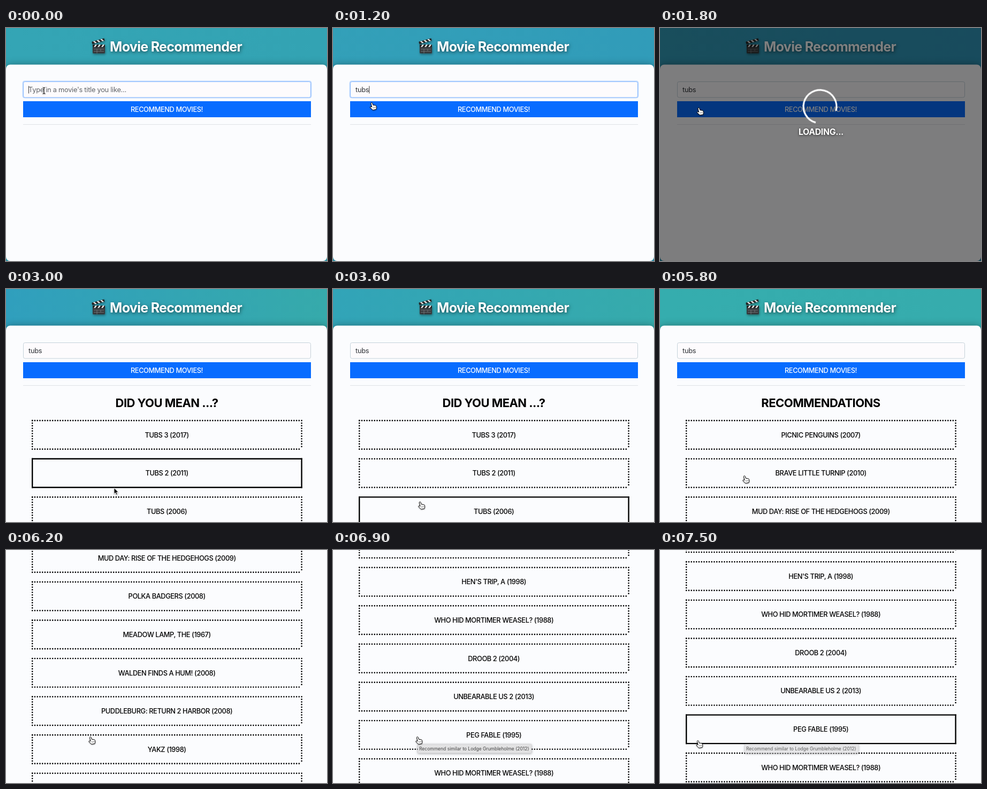
Write an HTML page that moves like this. It is 600x436 px and loops after 7600 ms.

```html
<!DOCTYPE html>
<html lang="en">
<head>
<meta charset="utf-8">
<title>Movie Recommender</title>
<style>
  html, body { margin: 0; width: 100%; height: 100%; overflow: hidden; background: #fbfcfe; }
  svg { display: block; width: 100vw; height: 100vh; }
  text { font: 12.8px Inter, Roboto, sans-serif; letter-spacing: -.02em; }
  .mid { text-anchor: middle; }
  #title { font-size: 25px; font-weight: 700; letter-spacing: -.028em; fill: #fff; filter: drop-shadow(1px 2px 3px #0008); }
  #heading { font-size: 22px; font-weight: 700; letter-spacing: -.025em; }
  #loading { font-size: 15.8px; font-weight: 700; fill: #fff; filter: drop-shadow(0 1px 2px #000a); }
  #tip text { font-size: 8.5px; letter-spacing: 0; fill: #404040; }
  #card { filter: drop-shadow(0 0 7px #0005); }
  .label { font-weight: 500; letter-spacing: -.032em; }
  .row path { fill: none; stroke: #000; stroke-width: 2.7; stroke-linecap: round; }
  .row.hover path { stroke-width: 2.4; stroke-dasharray: none; stroke-linecap: square; }
  .pointer { stroke-linejoin: round; filter: drop-shadow(0 1px 1px #0005); }
  #left { animation: left 7.6s linear infinite; }
  #right { animation: right 7.6s linear infinite; }
  #spinner { transform-origin: 299px 147px; animation: spin .9s steps(9) infinite; }
  @keyframes left {
    0% { stop-color: #34a5b5; } 23.7% { stop-color: #329dba; } 39.5% { stop-color: #309fbd; }
    61.8%, 100% { stop-color: #35adae; }
  }
  @keyframes right {
    0% { stop-color: #33a3b3; } 23.7% { stop-color: #3098bc; } 39.5% { stop-color: #36aaab; }
    61.8%, 100% { stop-color: #36acad; }
  }
  @keyframes spin { from { transform: rotate(105deg); } to { transform: rotate(465deg); } }
</style>
</head>
<body>
<svg viewBox="0 0 600 436" preserveAspectRatio="none">
  <defs>
    <linearGradient id="sky"><stop id="left" offset="0"/><stop id="right" offset="1"/></linearGradient>
  </defs>
  <g id="page">
    <rect width="600" height="436" fill="url(#sky)"/>
    <rect id="card" y="68.5" width="600" rx="8" fill="#fbfcfe"/>

    <g id="clapper" filter="drop-shadow(1px 2px 2px #0006)">
      <rect x="162" y="31" width="23" height="16.5" rx="1.5" fill="#373a3d"/>
      <path d="M162 31h23v4.5h-23z" fill="#222"/>
      <path d="M164 35.5l3-4.5h3l-3 4.5zm7 0l3-4.5h3l-3 4.5zm7 0l3-4.5h3l-3 4.5z" fill="#e8e8e8"/>
      <g transform="rotate(-16 162 30)">
        <path d="M161.5 25.5h24v4.5h-24z" fill="#222"/>
        <path d="M164 25.5l3 4.5h3l-3-4.5zm7 0l3 4.5h3l-3-4.5zm7 0l3 4.5h3l-3-4.5z" fill="#e8e8e8"/>
      </g>
      <path d="M164 39.5h19M164 43.5h19M170 39.5v8M177 39.5v4" stroke="#85898c" stroke-width=".7"/>
    </g>
    <text id="title" class="mid" x="317.5" y="44">Movie Recommender</text>

    <rect id="ring" x="30.5" y="98.5" width="541" height="33" rx="4.5" fill="#c2dbfe"/>
    <rect id="field" x="32.5" y="100.5" width="537" height="29.5" rx="3" fill="#fdfbfd"/>
    <text id="query" x="42" y="120.2"></text>
    <path id="caret" d="M0 108.5v14" stroke="#222" stroke-width=".9"/>
    <path d="M32 137h538v30H32z" fill="#086cff"/>
    <text class="mid label" x="300.5" y="156.8" fill="#fff">RECOMMEND MOVIES!</text>
    <path d="M32 180.5h538" stroke="#dfe2e6"/>

    <text id="heading" class="mid" x="300.5" y="221"></text>
    <g id="guesses"></g>
    <g id="results"></g>
  </g>

  <g id="overlay">
    <rect width="600" height="436" fill="#000" opacity=".5"/>
    <path id="spinner" d="M330 147A31 31 0 1 1 299 116" fill="none" stroke="#fff" stroke-width="3.2"/>
    <text id="loading" class="mid" x="301" y="199.5">LOADING...</text>
  </g>

  <g id="tip">
    <rect x="158.5" y="363.5" width="212.5" height="16.5" rx="1" fill="#e2e2e3" stroke="#d2d2d3" stroke-width=".6" filter="drop-shadow(0 1px 2px #0005)"/>
    <text class="mid" x="263.8" y="374.8">Recommend similar to Lodge Grumbleholme (2012)</text>
  </g>

  <g id="mouse">
    <path id="beam" class="pointer" d="M-2.5-6q2 0 2.5 1.5 .5-1.5 2.5-1.5M0-4.5v9M-2.5 6q2 0 2.5-1.5 .5 1.5 2.5 1.5" fill="none" stroke="#222" stroke-width="1.1"/>
    <path id="arrow" class="pointer" d="M0 0v11.2l2.6-2.4 1.8 4.2 2-.9-1.8-4h3.5z" stroke="#fff" stroke-width=".9"/>
    <g id="hand" class="pointer">
      <path d="M-2 1.4A1.3 1.3 0 0 1 .5.5L1.8 4.2l4.4.6q1.6.3 1.8 1.8l.3 2.6q0 1.4-.8 3.2l-5.3 1q-1 .1-1.8-.8L-3.2 9q-.9-1.1.1-1.7 1-.4 2.2.4l.6.3z" fill="#fff" stroke="#000" stroke-width="1"/>
      <path d="M2 8l.4 2.6M4 7.7l.4 2.6M5.9 7.4l.4 2.6" stroke="#333" stroke-width=".6"/>
    </g>
  </g>
</svg>
<script>
const LOOP = 7600, STEP = 100, FIRST_ROW = 273, PITCH = 71.6;
const BOX_W = 503.4, BOX_H = 53.5;
const $ = id => document.getElementById(id);
const show = (id, on) => { $(id).style.display = on ? '' : 'none'; };
const within = (t, from, to) => t >= from && t < to;

const lists = {
  guesses: ['TUBS 3 (2017)', 'TUBS 2 (2011)', 'TUBS (2006)'],
  results: [
    'PICNIC PENGUINS (2007)', 'BRAVE LITTLE TURNIP (2010)',
    'MUD DAY: RISE OF THE HEDGEHOGS (2009)', 'POLKA BADGERS (2008)',
    'MEADOW LAMP, THE (1967)', 'WALDEN FINDS A HUM! (2008)',
    'PUDDLEBURG: RETURN 2 HARBOR (2008)', 'YAKZ (1998)',
    'LODGE GRUMBLEHOLME (2012)', 'SNAIL PARADE (2005)',
    "HEN'S TRIP, A (1998)", 'WHO HID MORTIMER WEASEL? (1988)',
    'DROOB 2 (2004)', 'UNBEARABLE US 2 (2013)', 'PEG FABLE (1995)',
    'WHO HID MORTIMER WEASEL? (1988)'
  ]
};

// two parallel sides, each carrying a whole number of dots
const sides = (across, step, length, dots) =>
  `<path d="M0 0${step}${length}M${across}${step}${length}" stroke-dasharray="0 ${length / dots}"/>`;

for (const [id, titles] of Object.entries(lists)) {
  $(id).innerHTML = titles.map((title, i) =>
    `<g class="row" transform="translate(0 ${FIRST_ROW + i * PITCH})">
      <g transform="translate(49.2 -26.8)">
        ${sides(`0 ${BOX_H}`, 'h', BOX_W, 106)}${sides(`${BOX_W} 0`, 'v', BOX_H, 11)}
      </g>
      <text class="mid label" x="300.7" y="4.7">${title}</text></g>`).join('');
}

// time, x, y, pointer shape until the next point
const mousePath = [
  [0, 71, 117, 'beam'], [200, 71, 117, ''], [900, 71, 117, 'beam'],
  [1200, 73, 140, 'hand'], [1400, 73, 149.5, 'hand'], [2400, 73, 149.5, 'hand'],
  [2700, 150, 270, 'hand'], [2900, 195, 355, 'arrow'], [3000, 202, 372.3, 'arrow'],
  [3200, 202, 384, 'arrow'], [3400, 190, 397, 'hand'], [4000, 110, 402, 'hand'],
  [4400, 90, 404, ''], [5700, 90, 404, ''], [5800, 158.5, 350, 'hand'],
  [7100, 158.5, 350, 'hand'], [7400, 71.5, 357, 'hand'], [LOOP, 71.5, 357, 'hand']
];

function mouseAt(t) {
  const i = mousePath.findIndex(p => p[0] > t);
  const [t0, x0, y0, shape] = mousePath[i - 1], [t1, x1, y1] = mousePath[i];
  const k = (t - t0) / (t1 - t0);
  return { x: x0 + (x1 - x0) * k, y: y0 + (y1 - y0) * k, shape };
}

// a flick that speeds up, then glides to rest
function scrollAt(t) {
  const flick = 401.2, end = 940.4;
  if (t < 5900) return 0;
  if (t < 6200) return flick * ((t - 5900) / 300) ** 2;
  return end - (end - flick) * Math.exp((6200 - t) / 180);
}

function drawField(t) {
  const focused = t < 1700;
  const typed = 'tubs'.slice(0, [200, 400, 500, 700].filter(key => t >= key).length);
  const query = $('query');
  query.textContent = typed || "Type in a movie's title you like...";
  query.setAttribute('fill', typed ? '#2d3035' : '#5f6368');
  $('field').setAttribute('stroke', focused ? '#86b7fe' : '#c5d2da');
  show('ring', focused);
  show('caret', focused && t % 1000 < 800);
  const caretX = typed ? 42.5 + query.getComputedTextLength() : 42.5;
  $('caret').setAttribute('transform', `translate(${caretX} 0)`);
}

function drawRows(t, mouse, scroll) {
  const still = t < 5800 || t > 7100;
  for (const id in lists) {
    [...$(id).children].forEach((row, i) => {
      const offset = mouse.y + scroll - FIRST_ROW - i * PITCH;
      row.classList.toggle('hover', still && Math.abs(offset) < 28);
    });
  }
}

function draw(t) {
  const mouse = mouseAt(t), scroll = scrollAt(t);
  const guessing = within(t, 2300, 5800), done = t >= 5800;
  drawField(t);
  drawRows(t, mouse, scroll);
  $('page').setAttribute('transform', `translate(0 ${-scroll})`);
  $('card').setAttribute('height', done ? 1500 : guessing ? 420 : 367.5);
  $('heading').textContent = done ? 'RECOMMENDATIONS' : guessing ? 'DID YOU MEAN ...?' : '';
  show('guesses', guessing);
  show('results', done);
  show('overlay', within(t, 1700, 2300) || within(t, 5200, 5800));
  show('tip', t >= 6600);
  $('tip').style.opacity = t >= 7400 ? .85 : 1;
  $('mouse').setAttribute('transform', `translate(${mouse.x} ${mouse.y})`);
  for (const shape of ['beam', 'arrow', 'hand']) show(shape, shape === mouse.shape);
}

const start = performance.now();
function tick() {
  const t = (performance.now() - start) % LOOP;
  draw(Math.floor(t / STEP) * STEP);
  requestAnimationFrame(tick);
}
tick();
</script>
</body>
</html>
```
